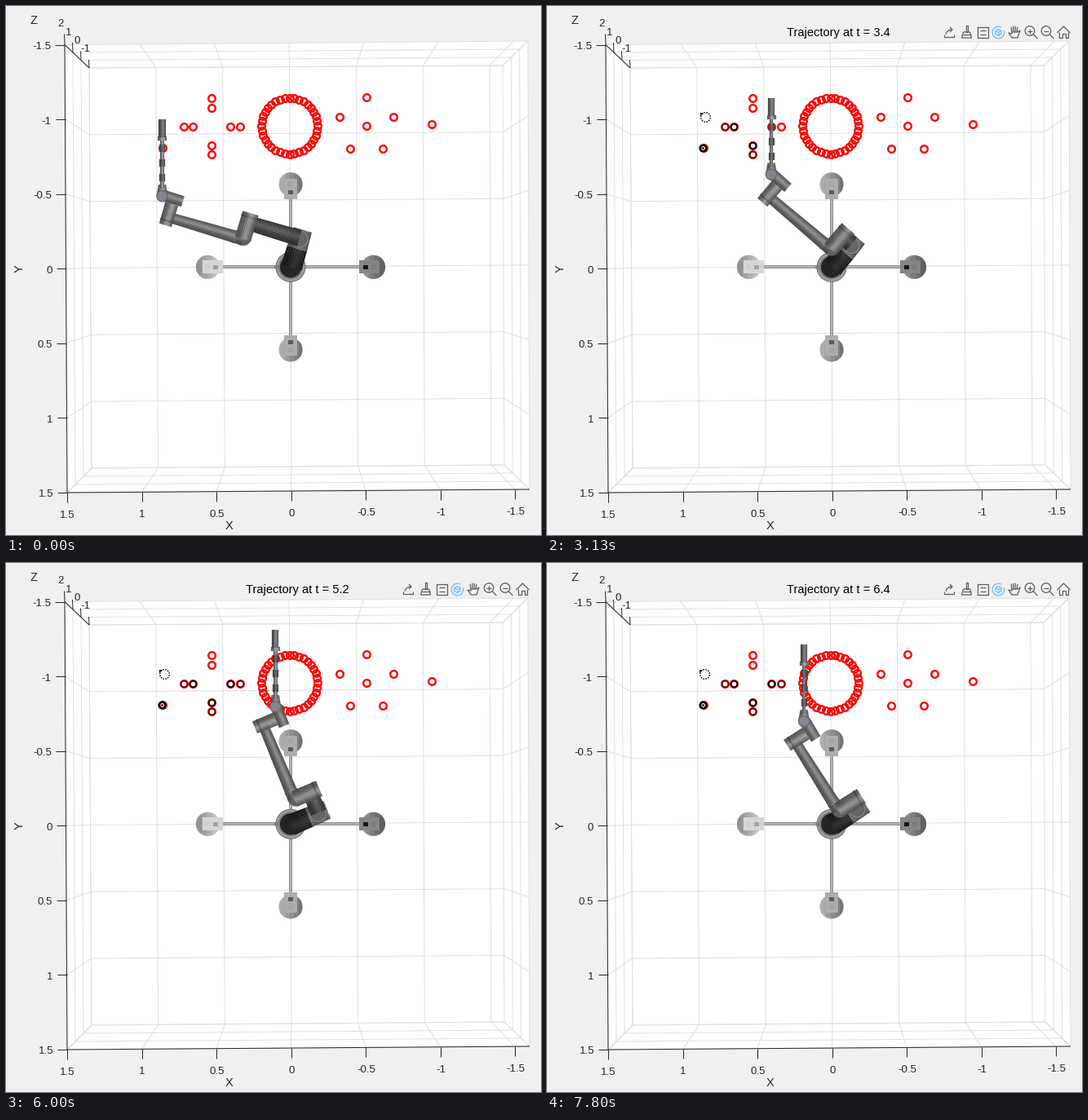
These frames come from a looping animation (656 px wide and 649 px high, 8 s). A matplotlib script:

```python
import numpy as np
import matplotlib.pyplot as plt
from matplotlib.animation import FuncAnimation
from matplotlib.collections import LineCollection, PolyCollection
from matplotlib.patches import Circle, Polygon, Rectangle

W, H, DPI = 656, 649, 64
PT = 72 / DPI                      # points per pixel
STEP, LOOP = 40, 8000
INK = "#262626"

fig = plt.figure(figsize=(W / DPI, H / DPI), dpi=DPI, facecolor="#f0f0f0")
ax = fig.add_axes([0, 0, 1, 1])
ax.set_xlim(0, W)
ax.set_ylim(H, 0)
ax.axis("off")


def vec(x, y):
    return np.array([x, y], float)


def polar(angle, r=1.0):
    """Vector at an angle in degrees, turning counterclockwise on screen."""
    a = np.radians(angle)
    return r * vec(np.cos(a), -np.sin(a))


def arc(c, r, start=0, stop=360, n=28):
    return np.array([c + polar(a, r) for a in np.linspace(start, stop, n)])


def lines(paths, color, width=1.0, z=1):
    item = LineCollection(paths, colors=color, linewidths=width * PT, zorder=z)
    return ax.add_collection(item, autolim=False)


def label(x, y, text, size=13.3, color=INK, **kw):
    kw = {"ha": "center", "va": "center_baseline", **kw}
    return ax.text(x, y, text, fontsize=size * PT, color=color,
                   family="Liberation Sans", zorder=8, **kw)


# ---- perspective box, grid and axes ----

OUTER = np.array([[72, 47.5], [640, 43], [642, 593], [75, 597]], float)
INNER = np.array([[102, 76], [609, 73], [611, 563], [105, 567]], float)
LEVELS = np.linspace(0, 1, 4)
XSTEP = 0.1614                     # share of the width per half unit


def at(level, u, v):
    tl, tr, br, bl = OUTER + (INNER - OUTER) * level
    return (tl * (1 - u) + tr * u) * (1 - v) + (bl * (1 - u) + br * u) * v


def draw_box():
    ax.add_patch(Polygon(OUTER, color="white", lw=0, zorder=0))
    grid = []
    for lv in LEVELS:
        ring = OUTER + (INNER - OUTER) * lv
        grid.append(np.vstack([ring, ring[:1]]))
    for k in range(7):
        u, v = k * XSTEP, k / 6
        grid.append([at(lv, u, s) for lv, s in ((0, 0), (1, 0), (1, 1), (0, 1))])
        grid.append([at(lv, s, v) for lv, s in ((0, 0), (1, 0), (1, 1), (0, 1))])
    for corner in ((1, 0), (1, 1), (0, 1)):
        grid.append([at(0, *corner), at(1, *corner)])
    lines(grid, "#dfdfdf")

    axes = [[at(0, 0, 0), at(0, 0, 1)], [at(0, 0, 1), at(0, 1, 1)],
            [at(0, 0, 0), at(1, 0, 0)]]
    for k in range(7):
        px, py = at(0, k * XSTEP, 1), at(0, 0, k / 6)
        axes.append([px, px + vec(0, 12)])
        axes.append([py, py + vec(-12, 0)])
        label(px[0] + 0.5, px[1] + 26.5, f"{1.5 - k / 2:g}")
        label(py[0] - 17, py[1] + 1, f"{k / 2 - 1.5:g}", ha="right")
    for k, lv in enumerate(LEVELS):
        p = at(lv, 0, 0)
        axes.append([p, p + vec(-0.5, -13 + k)])
        label(67 + 10 * k, 20.5 + 10.5 * k, str(2 - k))
    lines(axes, INK, 1, 2)
    label(274, 636.5, "X", 14.67)
    label(17, 322.5, "Y", 14.67, rotation=90, va="center")
    label(33.5, 16.5, "Z", 14.67)


# ---- stand with four pads ----

BASE = vec(349, 320.3)


def draw_pad(c, mean, slope, r=14.5, n=12):
    """Disc shaded from left to right in strips."""
    cuts = np.linspace(-1, 1, n + 1)
    strips = []
    for s0, s1 in zip(cuts[:-1], cuts[1:]):
        s = np.linspace(s0, s1, 5)
        h = np.sqrt(1 - s ** 2)
        x, y = np.append(s, s[::-1]), np.append(h, -h[::-1])
        strips.append(c + r * np.column_stack([x, y]))
    shades = [str(g) for g in mean + slope * (cuts[:-1] + cuts[1:]) / 2]
    ax.add_collection(PolyCollection(strips, facecolors=shades, zorder=2.5,
                                     edgecolors=shades, linewidths=0.3),
                      autolim=False)


def plate(c, w, h, shade, z):
    ax.add_patch(Rectangle(c - vec(w, h) / 2, w, h, color=str(shade), lw=0,
                           zorder=z))


def draw_stand():
    for angle in range(0, 360, 90):
        d = polar(angle)
        dx, upright = d[0], abs(d[1]) > 0.5
        size = (16, 25) if upright else (25, 16)
        rail = [[BASE, BASE + 90 * d]]
        lines(rail, "#8f8f8f", 4, 2.2)
        lines(rail, "#b2b2b2", 2, 2.2)
        draw_pad(BASE + 101.5 * d, 0.56 - 0.1 * dx,
                 -0.14 + 0.28 * max(-dx, 0))
        plate(BASE + 96 * d, *size, 0.68 - 0.16 * dx, 2.6)
        plate(BASE + 92 * d, 6, 5.5, 0.36 - 0.27 * dx, 2.7)
        ax.add_patch(Circle(BASE + 102 * d, 2.2, fc="none", lw=PT, zorder=2.7,
                            ec=str(0.6 - 0.16 * dx)))
    for r, shade in ((18.5, 0.42), (17.5, 0.62), (15, 0.48)):
        ax.add_patch(Circle(BASE, r, color=str(shade), lw=0, zorder=2.8))
    ax.add_patch(Circle(BASE - vec(17, 0), 3, color="0.5", lw=0, zorder=2.8))


# ---- way points: cross, ring and five-pointed group ----

NEAR, FAR = 23, 34.5
RING = vec(347.5, 147)
CROSS = vec(252, 147.7)
STAR = vec(442, 146.7)
START = vec(191.5, 174.2)
LEFT, RIGHT, DOWN = polar(180), polar(0), polar(270)


def way_points():
    pts = [START, STAR, vec(521.5, 144.7)]
    pts += [CROSS + polar(a, r) for a in range(0, 360, 90) for r in (NEAR, FAR)]
    pts += [STAR + polar(90 + 72 * k, FAR) for k in range(5)]
    pts += [RING + polar(10 * k, FAR) for k in range(36)]
    return np.array(pts)


def arm_stops():
    cross = [CROSS + d * r for d, r in
             ((DOWN, NEAR), (DOWN, FAR), (LEFT, FAR),
              (LEFT, NEAR), (RIGHT, NEAR), (RIGHT, FAR))]
    ring = [RING + polar(90 + 10 * k, FAR) for k in range(8)]
    return ([START, (START + cross[0]) / 2] + cross
            + [(cross[-1] + ring[0]) / 2] + ring)


STOPS = arm_stops()


def change_time(k):
    """Moment at which the arm jumps to stop k."""
    if k < 4:
        return 600 * k - 190 if k > 1 else 520
    return 2210 + 460 * (k - 4) + (80 if k > 6 else 0)


TIMES = [change_time(k) for k in range(1, len(STOPS))]


def marker(p, size, width, color, z, fill="none"):
    item = ax.plot(*np.transpose(p), "o", ms=size * PT, mfc=fill, mec=color,
                   ls="none", mew=width * PT, zorder=z)[0]
    item.set_snap(False)
    return item


def draw_points():
    marker(way_points(), 8.6, 2.4, "#ff0000", 3)
    spot = START - vec(0.7, 0)
    marks = [(marker(spot, 7.6, 2.6, "black", 4), TIMES[0]),
             (marker(spot, 2.6, 0, "black", 4, "black"), TIMES[0])]
    for k in range(2, 8):
        far = np.hypot(*(STOPS[k] - CROSS)) > 30
        mark = marker(STOPS[k], 7.6, 1.2 if far else 2, "#1a0808", 4)
        marks.append((mark, TIMES[k]))
    return marks


# ---- robot arm ----

OFFSET = 38                        # sideways distance from base to wrist


class Arm:
    def __init__(self):
        self.item = PolyCollection([], zorder=5, linewidths=0.25)
        ax.add_collection(self.item, autolim=False)

    def add(self, verts, shade, tint=0.0):
        g = min(max(shade, 0), 1)
        self.verts.append(verts)
        self.colors.append((g, g, min(g + tint, 1)))

    def disc(self, c, r, shade, tint=0.0):
        self.add(arc(c, r, n=22), shade, tint)

    def tube(self, p, q, r0, r1, shade, n=9):
        d = (q - p) / np.hypot(*(q - p))
        side = vec(-d[1], d[0])
        cuts = np.linspace(-1, 1, n + 1)
        for s0, s1 in zip(cuts[:-1], cuts[1:]):
            mid = (s0 + s1) / 2
            lit = 0.68 + 0.6 * np.exp(-((mid - 0.2) / 0.5) ** 2)
            self.add([p + side * r0 * s0, p + side * r0 * s1,
                      q + side * r1 * s1, q + side * r1 * s0], shade * lit)

    def gripper(self, tool):
        def piece(lo, hi, r, shade):
            self.tube(tool + vec(0, lo), tool + vec(0, hi), r, r, shade, 5)

        for k in range(7):
            odd = k % 2
            piece(50 - 9 * k, 41 - 9 * k, 2.3 + 1.2 * odd, 0.5 - 0.15 * odd)
        piece(-9, -14, 5.5, 0.52)
        piece(-13, -35, 4.2, 0.40)

    def pose(self, tool):
        self.verts, self.colors = [], []
        wrist = tool + vec(0, 59)
        v = wrist - BASE
        reach = np.sqrt(v @ v - OFFSET ** 2)
        heading = np.arctan2(v[1], v[0]) - np.arctan2(OFFSET, reach)
        d = vec(np.cos(heading), np.sin(heading))
        n = vec(-d[1], d[0])
        elbow = 10 + 1.1 * (reach - 125)
        end = reach - 14

        def P(along, side):
            return BASE + along * d + side * n

        # shoulder and upper arm
        self.disc(BASE, 13, 0.14)
        self.tube(P(-1, 0), P(-1, 24), 13, 12.5, 0.15)
        self.tube(P(-1, 24), P(-1, 48), 12.5, 11.5, 0.44)
        for r, shade in ((11.5, 0.30), (10.5, 0.60), (9.5, 0.40)):
            self.disc(P(-1, 36), r, shade)
        self.tube(P(0, 37), P(elbow, 37), 10, 9, 0.27)
        # forearm between elbow and wrist
        self.disc(P(elbow, 18), 10, 0.38)
        self.tube(P(elbow, 16), P(end, 15.5), 7.8, 6.2, 0.41)
        self.tube(P(elbow + 9, 16), P(elbow + 11, 16), 8.2, 8.2, 0.50)
        self.tube(P(elbow, 16), P(elbow, 49), 10, 10, 0.46)
        self.tube(P(elbow, 43), P(elbow, 45), 10.3, 10.3, 0.38)
        # wrist
        self.tube(P(reach - 26, 39), P(reach, 39), 6.5, 7, 0.42)
        self.tube(P(end, 5), P(end, 32), 7.8, 8.2, 0.46)
        self.tube(P(end, 10), P(end, 11.5), 8.2, 8.2, 0.34)
        self.tube(wrist, wrist - vec(0, 14), 7, 4.5, 0.46)
        self.disc(wrist, 7.2, 0.42)
        self.disc(wrist, 5.8, 0.52, 0.05)
        self.gripper(tool)
        self.item.set_verts(self.verts)
        self.item.set_facecolor(self.colors)
        self.item.set_edgecolor(self.colors)


# ---- toolbar and mouse pointers ----

def glyph(x, *points):
    return np.array(points) + vec(x, 32)


def export_icon(x):
    return [glyph(x, (-6, 3), (-6, 6), (6, 6), (6, 3)),
            arc(vec(x + 3, 36), 7, 90, 170, 8),
            glyph(x, (1, -6), (4, -3), (1, 0))]


def brush_icon(x):
    return [glyph(x, (-1, -8), (1, -8), (1, 0), (-1, 0), (-1, -8)),
            glyph(x, (-4, 0), (4, 0), (6, 7), (-6, 7), (-4, 0)),
            glyph(x, (-5, 3), (5, 3))]


def note_icon(x):
    box = glyph(x, (-6, -6), (7, -6), (7, 7), (-6, 7), (-6, -6))
    return [box] + [glyph(x, (-3, y), (4, y)) for y in (-2, 3)]


def hand_icon(x):
    fingers = [glyph(x, (s, 0), (1.3 * s, -7.5 + 0.15 * s * s))
               for s in (-3, -1, 1, 3)]
    palm = glyph(x, (-3, 7), (-7, 1), (-3, 2), (-3, 0), (4, 0), (7, -2),
                 (4, 7), (-3, 7))
    return fingers + [palm]


def zoom_icon(x, plus):
    c = vec(x, 30.5)
    bars = [(c - d, c + d) for d in (vec(3, 0), vec(0, 3))]
    return [arc(c, 5.8), (c + 4.3, c + 9.5)] + bars[:1 + plus]


def home_icon(x):
    return [glyph(x, (-8, 1), (0, -7), (8, 1)),
            glyph(x, (-5.5, 0), (-5.5, 7), (-2, 7), (-2, 2), (2, 2), (2, 7),
                  (5.5, 7), (5.5, 0))]


def orbit_icon(x):
    c = vec(x, 32.5)
    cube = arc(c, 4, 30, 390, 7)
    return [arc(c, 7.3, 60, 380), cube] + [(c, cube[k]) for k in (0, 2, 4)]


def draw_toolbar():
    gray = (export_icon(493) + brush_icon(514.5) + note_icon(533.5)
            + hand_icon(573) + zoom_icon(592, True) + zoom_icon(612, False)
            + home_icon(633.5))
    return [lines(gray, "#606060", 1.3, 7),
            lines(orbit_icon(553.5), "#7fc4f2", 1.5, 7)]


ARROW = np.array([(0, 0), (0, 16), (3.7, 12.6), (6.2, 18.4), (8.6, 17.3),
                  (6.1, 11.6), (11, 11.4)])
HEAD = np.array([(-6.5, -5.5), (-2.5, -5.5), (-6.5, -1.5)])


def arrow_at(t):
    """Pointer glides in, in five steps."""
    left = 1 - np.clip((t - 520) // 68, 0, 5) / 5
    return vec(190, 132) + vec(24, 34) * left ** 2


def spin_at(t):
    drift = np.clip((t - 1250) // 90, 0, 4) / 4
    return vec(193.5 + drift - (t >= 6260), 137.5 - drift)


# ---- timeline ----

draw_box()
draw_stand()
marks = draw_points()
arm = Arm()
toolbar = draw_toolbar()
title = label(357, 31.5, "", 14.67, "black")
arrow = ax.add_patch(Polygon(ARROW, fc="white", ec="black", lw=PT, zorder=9))
spin = ax.plot([], [], color="black", lw=1.5 * PT, ls=(0, (1, 1)), zorder=9)[0]
head = ax.add_patch(Polygon(HEAD, color="black", lw=0, zorder=9))


def update(i):
    t = i * STEP + 30
    k = sum(t >= when for when in TIMES)
    arm.pose(STOPS[k])
    title.set_text(f"Trajectory at t = {1.6 + 0.3 * k:.1f}" if k else "")
    for mark, when in marks:
        mark.set_visible(t >= when)

    active = t >= 1080
    for item in [*toolbar, spin, head]:
        item.set_visible(active)
    arrow.set_visible(588 <= t < 1080)
    arrow.set_xy(ARROW + arrow_at(t))
    c = spin_at(t)
    spin.set_data(*arc(c, 5.8, -200, 150).T)
    head.set_xy(c + HEAD)
    return [arm.item, title, arrow, spin, head]


anim = FuncAnimation(fig, update, frames=LOOP // STEP, interval=STEP,
                     repeat=True, repeat_delay=0, blit=False)
plt.show()
```
